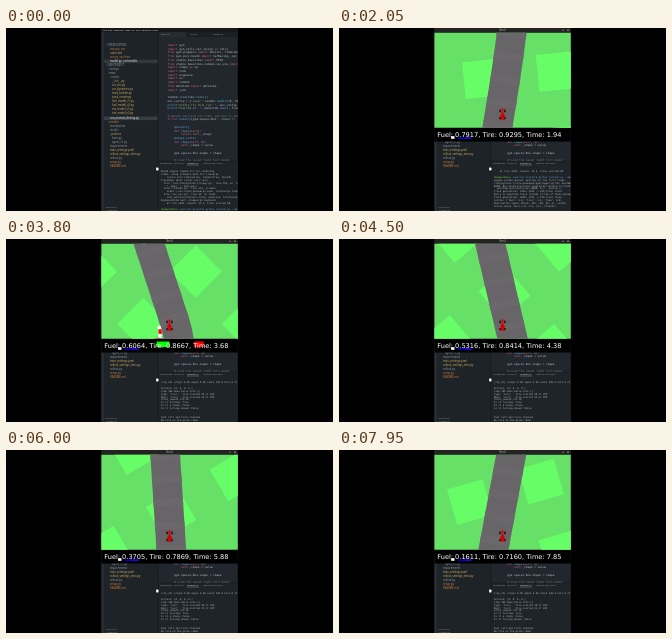
Recreate the animation shown at these times as an HTML page. Size 327 px wide and 183 px high, loop 8000 ms.

```html
<!DOCTYPE html>
<html lang="en">
<head>
<meta charset="utf-8">
<title>Racing run</title>
<style>
  html, body { margin: 0; width: 100%; height: 100%; overflow: hidden; background: #000; }
  svg { display: block; width: 100vw; height: 100vh; }
  text { white-space: pre; }
  .mono { font-family: "DejaVu Sans Mono", monospace; }
  .ui { font-family: "Noto Sans", sans-serif; }
</style>
</head>
<body>
<svg viewBox="0 0 327 183">
  <defs>
    <clipPath id="screen"><rect x="95.4" width="136.4" height="183"/></clipPath>
    <clipPath id="view"><rect x="95" y="4.8" width="137" height="94.9"/></clipPath>
    <clipPath id="side"><rect x="95" width="56" height="183"/></clipPath>
    <path id="track" d="M-66 243 C-40 150 -16 70 0 0 L4.6 -20 C15 -48 12 -53 -12.5 -65.5 L-560 -341.2 C-760 -443 -800 -250 -720 -100 S-600 250 -450 400 S-142 515 -66 243 Z"/>
  </defs>
  <rect width="327" height="183"/>
  <g clip-path="url(#screen)">
    <rect x="95" width="137" height="183" fill="#21272c"/>
    <rect x="95" width="3" height="183" fill="#272d32"/>
    <rect x="98" y="4" width="54" height="179" fill="#1d2327"/>
    <rect x="152" y="4" width="80" height="5" fill="#1b2024"/>
    <rect x="153" y="4" width="27" height="5" fill="#262c32"/>
    <rect x="95" width="137" height="4" fill="#17191b"/>
    <rect x="98" y="31.6" width="54" height="3.6" fill="#30373d"/>
    <rect x="98" y="88.5" width="54" height="3.6" fill="#363d44"/>
    <rect x="152" y="133" width="80" height="50" fill="#1e2428"/>
    <path d="M152 4V183M152 133H232" stroke="#15191c" stroke-width=".6"/>
    <g id="tree" class="ui" font-size="2.7" clip-path="url(#side)"></g>
    <g id="code" class="mono" font-size="2.8"></g>
    <g class="ui" font-size="2.4" fill="#8a919d">
      <text x="97" y="2.7" fill="#e4e4e4">File  Edit  Selection  View  Go  Run  Terminal  Help</text>
      <text x="155" y="7">train.py</text><text x="184" y="7">env.py</text><text x="207" y="7">model.py</text>
      <text x="154" y="136">PROBLEMS   OUTPUT</text>
      <text x="181" y="136" fill="#d8dbe0">TERMINAL</text>
      <text x="197" y="136">DEBUG CONSOLE</text>
      <text x="99" y="179.8">› OUTLINE</text><text x="99" y="182.8">› TIMELINE</text>
    </g>
    <path d="M181 137H193" stroke="#aab" stroke-width=".4"/>
    <g id="term" class="mono" font-size="2.4"></g>
    <g id="win">
      <rect x="95" width="137" height="113.5"/>
      <rect x="95" width="137" height="4.8" fill="#232323"/>
      <text class="ui" x="163.5" y="3.2" font-size="2.6" fill="#bbb" text-anchor="middle">Sim 4</text>
      <circle cx="224" cy="2.2" r=".7" fill="#888"/><circle cx="229" cy="2.2" r=".8" fill="#aaa"/>
      <g clip-path="url(#view)">
        <g id="zoom">
          <g id="world">
            <rect x="-1161" y="-652" width="1481" height="1481" fill="#66e066"/>
            <path id="grass" fill="#66fd66"/>
            <g fill="none">
              <use href="#track" stroke="#676567" stroke-width="29.6"/>
              <use href="#track" stroke="#6a686a" stroke-width="29.6" stroke-dasharray="7.8 15.6"/>
              <g stroke-width="3.2">
                <path d="M-19 -50.5 Q-9 -46 -6.5 -33" stroke="#fff"/>
                <path d="M-19 -50.5 Q-9 -46 -6.5 -33" stroke="#f00000" stroke-dasharray="4.6 4.2" stroke-dashoffset="-3.4"/>
              </g>
              <path id="skid" stroke="#000" stroke-width="1.1"/>
            </g>
          </g>
          <g id="car" transform="scale(.0444 -.0444)">
            <path d="M-69 53h28v54h-28zM41 53h28v54h-28zM-69 -109h28v54h-28zM41 -109h28v54h-28z"/>
            <path fill="#d40000" d="M-60 130H60V110H-60zM-15 120H15L20 20H-20zM25 20L50 -10V-40L20 -90H-20L-50 -40V-10L-25 20zM-50 -120H50V-90H-50z"/>
          </g>
        </g>
      </g>
      <rect id="speed" x="112.1" width="3.4" fill="#fff"/>
      <rect id="front" x="119" width="6.8" fill="#00f"/>
      <rect id="rear" x="125.8" width="6.8" fill="#30f"/>
      <rect id="steer" y="102.5" height="5.5" fill="#0f0"/>
      <rect id="spin" y="102.5" height="5.5" fill="#f00"/>
      <text id="stats" x="98.3" y="109.2" font-size="6.6" fill="#fff" font-family="DejaVu Sans, sans-serif"></text>
    </g>
    <path d="M150.4 139.6h1.6l.7 1.2-.5 1.8h-1.7l-.5-1.6z" fill="#fff"/>
  </g>
</svg>
<script>
const $ = id => document.getElementById(id);
const NS = "http://www.w3.org/2000/svg";
const LOOP = 8000, STEP = 50, OPEN = 0.1;
const GRID = 74.07, START = 60, SKID_END = 125;

function addText(parent, x, y, parts) {
  const el = document.createElementNS(NS, "text");
  el.setAttribute("x", x);
  el.setAttribute("y", y);
  for (const [str, fill] of parts) {
    const span = document.createElementNS(NS, "tspan");
    span.textContent = str;
    span.setAttribute("fill", fill);
    el.append(span);
  }
  parent.append(el);
}

// File tree: indent, colour key, label
const tint = { g: "#8f96a3", y: "#c9aa62", o: "#c9793f", w: "#dfe2e8" };
`0g› OPEN EDITORS
2otrain.py  car
2ynotes.md
2oenv.py  car/envs
2wmodel.py  car/models
0g› CAR-PROJECT
1g› configs
1y› envs
2g› tracks
3y__init__.py
3ycar_env.py
3ycar_dynamics.py
3ytrack_builder.py
3ytrack_render.py
3yfuel_model_v1.py
3yfuel_model_v2.py
3ytire_model_v1.py
3ytire_model_v2.py
2wrun_manual_driving.py
1o› models
2gcheckpoints
2gresults
2y› policies
3gbase.py
3gagent_v1.py
2grequirements
2ytrain_settings.yaml
2yrollout_settings_tests.py
2grollout.py
2osetup.py
2oREADME.md`.split("\n").forEach((row, i) =>
  addText($("tree"), 100 + 2 * row[0], 17.6 + 4.05 * i, [[row.slice(2), tint[row[1]]]]));

// Editor with a small highlighter
const rules = /(#.*)|('[^']*'|"[^"]*")|\b(import|from|as|if|not|def|return)\b|(@[\w.]+|\b\w+(?=\())|(\bself\b)|([^#'"@\w]+|\w+|.)/g;
const hues = ["#6f7888", "#93b873", "#d0608a", "#61a5e0", "#d86a70", "#b9bfca"];
`import gym
import gym_utils.car_racing as utils
from gym.wrappers import Monitor, TimeLimit, RecordVideo
from gym.envs.box2d import CarRacing, car_dynamics
from stable_baselines import PPO2
from stable_baselines.common.vec_env import DummyVecEnv
import numpy as np
import time
import argparse
import os
import random
from datetime import datetime
import json

random.seed(time.time())
env_config = {'seed': random.randint(0, 1000), 'laps': 1}
print("Config for this run: ", env_config, flush=True)
print("Started at: ", datetime.now(), flush=True)

# Handle patching for older gym box to add 'shape'
if not hasattr(gym.spaces.Box, 'shape'):

    @property
    def shape(self):
        return self._shape
    @shape.setter
    def shape(self, x):
        self._shape = value

    gym.spaces.Box.shape = shape

    # Load the saved right turn model`.split("\n").forEach((line, i) =>
  addText($("code"), 161.5, 18 + 3.72 * i,
    [...line.matchAll(rules)].map(m => [m[0], hues[m.slice(1).findIndex(Boolean)]])));

// Terminal
const intro = `Box2D engine loaded for car rendering
libGL: using software path for 1 display
    return self.step(action, render=True, fps=50)
Traceback (most recent call last):
  File "/usr/lib/python3.7/runpy.py", line 193, in _run
    "__main__", mod_spec)
  File "rollout.py", line 214, in main
    state = env.reset(seed=args.seed, track=args.track)
  File "car_env.py", line 95, in reset
    self.world.build(self.track, wheels=4, friction=0.9)
KeyboardInterrupt: stopped by keyboard
    at tick 1640, reward -12.4, tiles visited 88

$dev@workbox:~/git/car-project$ python rollout.py --manual
pygame window opened, waiting for the first frame
/lib/python3.7/site-packages/gym/logger.py:30: UserWarning:
WARN: Box bound precision lowered by casting to float32
  warnings.warn(colorize('WARN: %s', 'yellow'))
Track generation: 1164..1459 -> 295-tiles track
Retry to generate track (normal if few of these messages)
Track generation: 1098..1376 -> 278-tiles track
Config: {'fuel': 1.0, 'tire': 1.0, 'time': 0.0}
Observation space: Box(0, 255, (96, 96, 3), uint8)
Action space: Box(-1.0, 1.0, (3,), float32)

Key bindings: arrows, space, escape`.split("\n");
const block = `[ray_at] origin 0.00 angle 0.00 reach 140.0 hits 0 of 24

Actions: [0. 0. 0. 0.]
step 100 done False info {}
Type: 'turn', 'tile visited 30 of 295'
Next: 'turn', 'tile visited 31 of 295'
total_reward +72.18
Is it turning: True
Is it a sharp: False
Is it turning ahead: False


Fuel left and tires checked
No tile on the given radar`.split("\n");
const lines = [...intro, ...block, ...block, ...block, ...block];
const scrolls = [[0, 0], [0.35, 5], [0.6, 11], [2.2, 17], [3.6, 26], [5.5, 40], [7.2, 54]];
let shown = -1;

function drawTerm(t) {
  const top = scrolls.filter(k => k[0] <= t).pop()[1];
  if (top === shown) return;
  shown = top;
  $("term").replaceChildren();
  for (let i = 0; i < 14; i++) {
    const s = lines[top + i] || "";
    const cut = s.indexOf(":") + 1;
    addText($("term"), 155, 144 + 2.9 * i, s[0] === "$"
      ? [[s.slice(1, cut), "#7ee03c"], [s.slice(cut), "#6aa0e8"]]
      : [[s, "#b4bcc4"]]);
  }
}

// Grass squares
let squares = "";
for (let i = -15; i < 5; i++)
  for (let j = -8; j < 12; j++)
    squares += `M${-50 + GRID * i} ${-59.5 + GRID * j}h37v37h-37z`;
$("grass").setAttribute("d", squares);

// Time, distance along track, offset to the right, yaw against the road
const drive = [
  [0.1, START, 4.5, 0], [1.05, 110, 4.5, 0], [3, 252, 0, -13], [3.8, 326, -6, 17],
  [5.2, 486, -5.5, 5], [6.95, 688, 5, 2], [7.95, 805, 6.5, -10.6]];
// Time, fuel, tire, clock
const gauges = [
  [0.1, 1, 1, 0], [1.05, .8967, .9650, .96], [3, .6919, .8957, 2.87], [3.8, .6064, .8667, 3.68],
  [5.2, .4568, .8161, 5.08], [6.95, .2680, .7522, 6.84], [7.95, .1611, .7160, 7.85]];

function sample(keys, t, col, smooth) {
  const last = keys.length - 1;
  let i = 0;
  while (i < last - 1 && t >= keys[i + 1][0]) i++;
  const a = keys[i], b = keys[i + 1], span = b[0] - a[0];
  const u = Math.min(1, Math.max(0, (t - a[0]) / span));
  if (!smooth) return a[col] + (b[col] - a[col]) * u;
  const slope = n => {
    if (n === 0) return 0;
    const p = keys[n - 1], q = keys[Math.min(last, n + 1)];
    return (q[col] - p[col]) / (q[0] - p[0]);
  };
  const v = 1 - u;
  return a[col] * (1 + 2 * u) * v * v + b[col] * u * u * (3 - 2 * u)
    + span * u * v * (slope(i) * v - slope(i + 1) * u);
}

const track = $("track");
function roadAt(s, lat) {
  const p = track.getPointAtLength(s);
  const a = track.getPointAtLength(s - 1), b = track.getPointAtLength(s + 1);
  const dir = Math.atan2(b.x - a.x, a.y - b.y);
  return { x: p.x + lat * Math.cos(dir), y: p.y + lat * Math.sin(dir), deg: dir * 180 / Math.PI };
}

function bar(id, height) {
  $(id).setAttribute("y", 110.8 - height);
  $(id).setAttribute("height", height);
}
function swing(id, right, width) {
  $(id).setAttribute("x", right - width);
  $(id).setAttribute("width", width);
}

function draw(t) {
  drawTerm(t);
  $("win").style.display = t < OPEN ? "none" : "";
  if (t < OPEN) return;

  const [fuel, tire, clock] = [1, 2, 3].map(c => sample(gauges, t, c));
  const [s, lat, yaw] = [1, 2, 3].map(c => sample(drive, t, c, true));
  const pos = roadAt(s, lat);
  const near = Math.min(1, clock);
  const zoom = (0.1 * (1 - near) + 2.7 * near) / 2.7;
  $("zoom").setAttribute("transform", `translate(163.5 86.5) scale(${zoom})`);
  $("world").setAttribute("transform", `rotate(${-pos.deg - yaw}) translate(${-pos.x} ${-pos.y})`);

  const end = Math.min(s - 3, SKID_END);
  $("skid").setAttribute("d", end <= START ? "" : [-2.6, 2.6].map(off => {
    const a = roadAt(START, 4.5 + off), b = roadAt(end, 4.5 + off);
    return `M${a.x} ${a.y}L${b.x} ${b.y}`;
  }).join(""));

  const pace = Math.min(1, clock / 1.2);
  bar("speed", 2.6 * pace);
  bar("front", 1.3 * pace);
  bar("rear", 1.5 * pace);
  const turn = Math.exp(-(((t - 3.72) / 0.3) ** 2));
  swing("steer", 163.5, 14 * turn);
  swing("spin", 197.8, 10.5 * turn);
  $("stats").textContent =
    `Fuel: ${fuel.toFixed(4)}, Tire: ${tire.toFixed(4)}, Time: ${clock.toFixed(2)}`;
}

function tick(now) {
  draw(Math.floor((now % LOOP) / STEP) * STEP / 1000);
  requestAnimationFrame(tick);
}
tick(performance.now());
</script>
</body>
</html>
```
